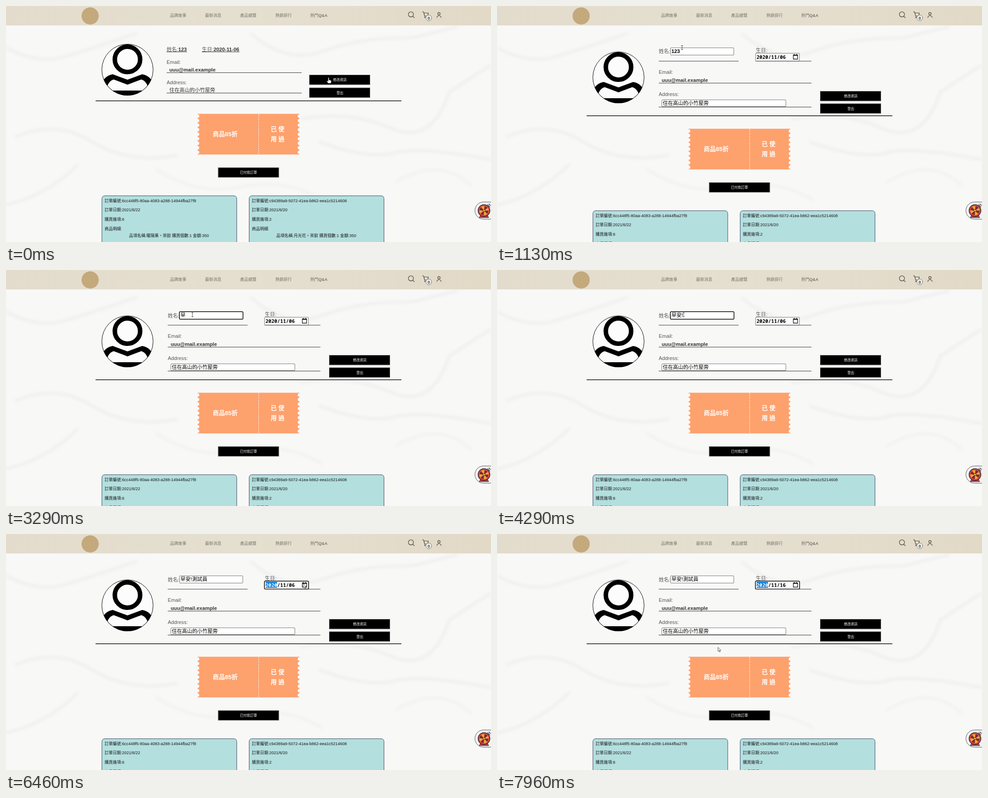
Write an HTML page that moves like this. It is 1072 by 522 pixels and loops after 8 s.

```html
<!DOCTYPE html>
<html lang="zh-Hant">
<head>
<meta charset="utf-8">
<title>會員中心</title>
<style>
html, body { margin: 0; width: 100%; height: 100%; overflow: hidden; background: #f8f8f7; }
body { position: relative; font: 11.25px "Liberation Sans", "Noto Sans CJK TC", "Noto Sans CJK", sans-serif; }
svg { position: absolute; left: 0; top: 0; }
text { white-space: pre; fill: #555; }
.b { font-weight: 700; fill: #333; }
.m { font-weight: 500; fill: #333; }
.nav text { font-size: 9px; font-weight: 500; fill: #79736a; }
.line { stroke: #333; stroke-width: 1; }
.btn rect { width: 134px; height: 21.5px; fill: #000; stroke: #777; }
.btn text { font-size: 7.5px; fill: #fff; text-anchor: middle; }
.ticket text { font-size: 13.4px; font-weight: 700; fill: #fff; }
.card rect { width: 298px; height: 140px; fill: #b3dfde; stroke: #3c4560; }
.card text { font-size: 9px; fill: #161616; }
.icon { fill: none; stroke: #47443f; stroke-width: 1.2; stroke-linecap: round; stroke-linejoin: round; }

.field { position: absolute; box-sizing: border-box; border: 1px solid #767676; border-radius: 2px;
  background: #fff; color: #000; font-weight: 700; white-space: pre; padding-left: 1.5px; }
.name { left: 383px; top: 92px; width: 141px; height: 17px; line-height: 15px; }
.addr { left: 364px; top: 207px; width: 275px; height: 16px; line-height: 15px; font-weight: 500; }
.date { left: 571px; top: 103.5px; width: 98px; height: 18px; line-height: 16px;
  font-family: "Noto Sans Mono", monospace; font-size: 10.8px; }
.date span { display: inline-block; line-height: 13px; }

.view, .edit, .low, .label, .name, .name::after, .date, .year, .day::after, .hand, .beam, .arrow
  { animation: 8s step-end infinite; }
.view { animation-name: view; }
.edit { animation-name: edit; }
.low { animation-name: low; }
.label { animation-name: label; }
.name { animation-name: edit, nameFocus; }
.date { animation-name: edit, dateFocus; }
.year { animation-name: year; }
.name::after { content: "123"; animation-name: typing; }
.day::after { content: "06"; animation-name: day; }
.hand { animation-name: hand; }
.beam { animation-name: beam; }
.arrow { animation-name: arrow; }
.mouse { animation: move 8s linear infinite; }

@keyframes view { 0% { visibility: visible } 13%, 100% { visibility: hidden } }
@keyframes edit { 0% { visibility: hidden } 13%, 100% { visibility: visible } }
@keyframes low { 0% { transform: none } 13%, 100% { transform: translateY(33px) } }
@keyframes label { 0% { transform: none } 40%, 100% { transform: translateY(1px) } }
@keyframes nameFocus {
  0%, 73% { border-color: #767676; box-shadow: none }
  19% { border-color: #000; box-shadow: 0 0 0 .5px #000 }
  100% { border-color: #767676; box-shadow: none }
}
@keyframes dateFocus {
  0% { border-color: #767676; box-shadow: none }
  76%, 100% { border-color: #000; box-shadow: 0 0 0 .5px #000 }
}
@keyframes year {
  0% { background: none; color: #000 }
  76%, 100% { background: #0078d7; color: #fff }
}
@keyframes typing {
  0% { content: "123"; font-weight: 700 }
  25.5% { content: "12"; font-weight: 700 }
  27% { content: "1"; font-weight: 700 }
  29.5% { content: ""; font-weight: 500 }
  40% { content: "早"; font-weight: 500 }
  46% { content: "早安"; font-weight: 500 }
  52% { content: "早安!"; font-weight: 500 }
  60% { content: "早安!測"; font-weight: 500 }
  63% { content: "早安!測試"; font-weight: 500 }
  66%, 100% { content: "早安!測試員"; font-weight: 500 }
}
@keyframes day { 0% { content: "06" } 93%, 100% { content: "16" } }
@keyframes hand { 0% { visibility: visible } 13%, 100% { visibility: hidden } }
@keyframes beam { 0%, 73% { visibility: hidden } 13% { visibility: visible } 100% { visibility: hidden } }
@keyframes arrow { 0% { visibility: hidden } 73%, 100% { visibility: visible } }
@keyframes move {
  0% { transform: translate(713px, 158px) }
  11%, 11.5% { transform: translate(712px, 158px) }
  14.1%, 17% { transform: translate(409px, 92px) }
  19%, 40% { transform: translate(412px, 99px) }
  53%, 69% { transform: translate(412.5px, 99px) }
  78%, 87% { transform: translate(657.5px, 110px) }
  93% { transform: translate(620px, 190px) }
  98.5%, 100% { transform: translate(488.5px, 250.5px) }
}
</style>
</head>
<body>
<svg width="1072" height="522" viewBox="0 0 1072 522">
  <defs>
    <linearGradient id="bar"><stop stop-color="#e3dccd"/><stop offset=".5" stop-color="#e5dfd0"/><stop offset="1" stop-color="#e2d9c7"/></linearGradient>
    <filter id="soft" x="-10%" y="-10%" width="120%" height="120%"><feGaussianBlur stdDeviation="3"/></filter>
    <clipPath id="round"><circle cx="268.5" cy="141" r="57"/></clipPath>
    <g id="avatar">
      <circle cx="268.5" cy="141" r="57" fill="#fcfcfc"/>
      <g clip-path="url(#round)">
        <circle cx="268.5" cy="118" r="28" fill="none" stroke="#000" stroke-width="10"/>
        <path d="M208 186Q212 155 236 151L268.5 163L301 151Q325 155 329 186V200H208Z"/>
        <path d="M222 187C223 174 229 165 238 162.500L268.500 174L299 162.500C308 165 314 174 315 187Z" fill="#fcfcfc"/>
      </g>
      <circle cx="268.5" cy="141" r="56.700" fill="none" stroke="#000"/>
    </g>
  </defs>

  <g filter="url(#soft)" fill="none" stroke="#efefee" stroke-width="6">
    <path d="M0 92Q70 130 130 112T290 60M20 290Q110 250 190 300T380 330"/>
    <path d="M540 60Q620 130 700 100T900 70L1000 45M690 300Q800 340 860 325T1072 340"/>
    <path d="M650 250Q760 230 850 270T980 190L1072 130M0 440Q90 420 160 350"/>
    <path d="M860 390Q960 330 1030 400M330 360Q420 420 520 400T700 430" stroke-width="4"/>
  </g>

  <path d="M0 0H1072V43H0Z" fill="url(#bar)"/>
  <circle cx="186" cy="22" r="19" fill="#c4a97c"/>
  <g class="nav">
    <text x="362.500" y="23.500">品牌故事</text>
    <text x="440" y="23.500">最新消息</text>
    <text x="517.500" y="23.500">產品總覽</text>
    <text x="595.500" y="23.500">熱銷排行</text>
    <text x="672.500" y="23.500">熱門<tspan font-weight="700">Q&amp;A</tspan></text>
  </g>
  <g class="icon">
    <circle cx="895" cy="18.500" r="5.700"/><path d="M899.200 22.700L902.500 26"/>
    <path d="M920.500 13H923L925.300 22H932L933.500 15.500H924"/>
    <circle cx="926" cy="25" r=".8"/>
    <circle cx="957" cy="17" r="2.600"/><path d="M952.300 25.500Q952.500 21.500 957 21.500T961.700 25.500"/>
    <circle cx="934.500" cy="26.300" r="6.300" fill="#f5f3ee" stroke="#666" stroke-width=".9"/>
  </g>
  <text x="934.500" y="29.500" font-size="9" text-anchor="middle" class="b">0</text>

  <g class="view">
    <use href="#avatar"/>
    <text x="355" y="99.800">姓名:<tspan class="b">123</tspan></text>
    <text x="433" y="99.800">生日:<tspan class="b">2020-11-06</tspan></text>
    <path class="line" d="M355 101.500H400M433 101.500H516M355 147.500H653.500M355 192.500H653.500"/>
    <text x="355" y="128">Email:</text>
    <text x="361" y="145" class="b">uuu@mail.example</text>
    <text x="355" y="173">Address:</text>
    <text x="361" y="190.300" class="m">住在高山的小竹屋旁</text>
    <g class="btn">
      <rect x="670.500" y="152.500"/><text x="738" y="166.300">修改資訊</text>
      <rect x="670.500" y="181"/><text x="738" y="195">登出</text>
    </g>
  </g>

  <g class="edit">
    <use href="#avatar" y="17"/>
    <text x="357.500" y="103.500" class="label">姓名:</text>
    <text x="572" y="101.500">生日:</text>
    <path class="line" d="M357.500 122H534M571.500 122H695M357.500 170.500H695M357.500 223.500H695"/>
    <text x="357.500" y="150.300">Email:</text>
    <text x="364" y="168" class="b">uuu@mail.example</text>
    <text x="357.500" y="198.800">Address:</text>
    <g class="btn">
      <rect x="714.500" y="188.500"/><text x="782" y="202.300">修改資訊</text>
      <rect x="714.500" y="216"/><text x="782" y="230">登出</text>
    </g>
  </g>

  <g class="low">
    <path d="M198 209.800H874" stroke="#111" stroke-width="1.500"/>
    <g class="ticket">
      <path d="M423.500 238.500H648.500V328.500H423.500Z" fill="#fda16d"/>
      <path d="M423.500 243.500V328M648.500 243.500V328" stroke="#f8f8f7" stroke-width="7.500" stroke-linecap="round" stroke-dasharray="0 10"/>
      <path d="M558.500 239V328" stroke="#fff" stroke-width="1" stroke-dasharray="3 2"/>
      <text x="457" y="288">商品85折</text>
      <text x="585" y="276.500">已 使</text>
      <text x="585" y="299">用 過</text>
    </g>
    <g class="btn"><rect x="469" y="357.500"/><text x="536" y="371.300">已付款訂單</text></g>
    <g class="card">
      <rect x="212" y="419.800" rx="6"/>
      <text x="218" y="433.500">訂單編號:6cc448f5-80aa-4083-a288-14944fba27f8</text>
      <text x="218" y="454.300">訂單日期:2021/6/22</text>
      <text x="218" y="475">購買幾項:6</text>
      <text x="218" y="495.800">商品明細</text>
      <text x="272" y="510.500">品項名稱:暖陽果。茶飲 購買個數:1 金額:350</text>
    </g>
    <g class="card">
      <rect x="537.500" y="419.800" rx="6"/>
      <text x="543.500" y="433.500">訂單編號:c94389a9-5072-41ea-b862-eea1c5214608</text>
      <text x="543.500" y="454.300">訂單日期:2021/6/20</text>
      <text x="543.500" y="475">購買幾項:2</text>
      <text x="543.500" y="495.800">商品明細</text>
      <text x="597.500" y="510.500">品項名稱:月光花。茶飲 購買個數:1 金額:350</text>
    </g>
  </g>

  <path d="M1073 433.500H1055.500A19 19 0 0 0 1055.500 471.500H1073" fill="#f3f3f3" stroke="#555"/>
  <path d="M1049 463H1064L1067 468H1046Z" fill="#d6403c" stroke="#2b2036"/>
  <circle cx="1056.500" cy="452.500" r="13" fill="#e2523f" stroke="#2b2036" stroke-width="1.500"/>
  <circle cx="1056.500" cy="452.500" r="10" fill="#f6a436"/>
  <circle cx="1056.500" cy="452.500" r="5" fill="none" stroke="#7a2a35" stroke-width="10" stroke-dasharray="3.927"/>
  <circle cx="1056.500" cy="452.500" r="2.500" fill="#f9c552" stroke="#2b2036"/>
  <path d="M1064 439L1070 445M1067 437.500L1071 441.500" stroke="#2b2036" stroke-width="1.200"/>
</svg>

<div class="field name"></div>
<div class="field date"><span class="year">2020</span>/11/<span class="day"></span></div>
<div class="field addr edit">住在高山的小竹屋旁</div>

<svg width="1072" height="522" viewBox="0 0 1072 522">
  <g class="edit" fill="none" stroke="#111" stroke-width="1.300">
    <path d="M655 108.500H664.500V117.500H655Z"/><path d="M655 109H664.500M657 106.500V109M662.500 106.500V109" stroke-width="2"/>
  </g>
  <g class="mouse">
    <path class="hand" d="M-1 1Q0-1 1 1V5.500L5 6.500Q6.500 7 6 9L5 13H-1L-4 8.500Q-4 6.500-1 8.500Z" fill="#fff" stroke="#222" stroke-width=".7"/>
    <path class="beam" d="M-2-4.500H2M0-4.500V4.500M-2 4.500H2" fill="none" stroke="#333" stroke-width=".9"/>
    <path class="arrow" d="M0 0V9L2 7.200L3.500 10.500L5 9.800L3.500 6.700H6.300Z" fill="#fff" stroke="#222" stroke-width=".8"/>
  </g>
</svg>
</body>
</html>
```
